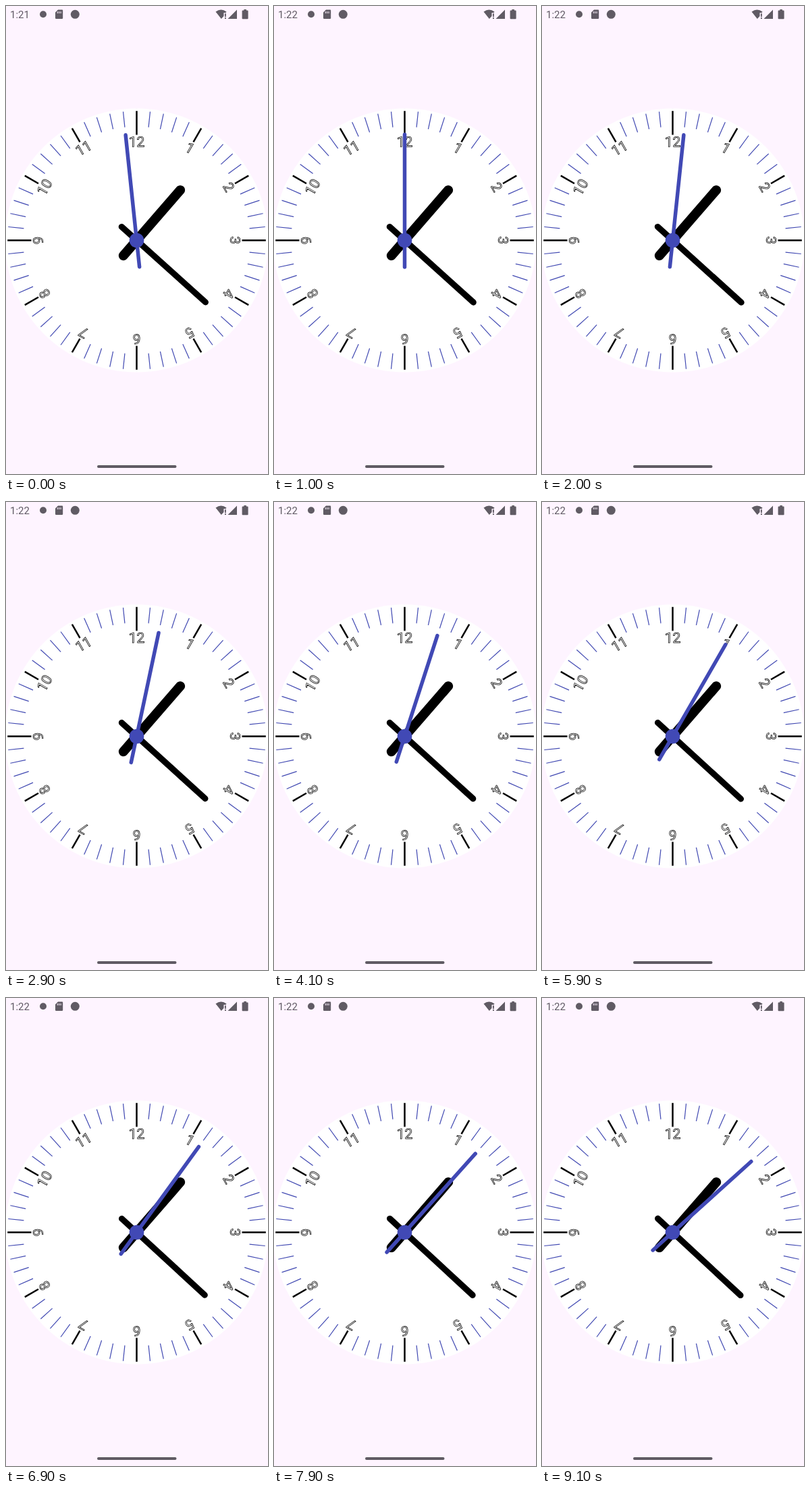
An HTML page for the animation above (9700 ms loop, 388 by 692 pixels).

```html
<!DOCTYPE html>
<html lang="en">
<head>
<meta charset="utf-8">
<title>Analog clock</title>
<style>
  html, body { margin: 0; width: 100%; height: 100%; overflow: hidden; background: #fef4ff; }
  svg { display: block; width: 388px; height: 692px; }
  .status { fill: #605b64; }
  .status text { font: 15px Roboto, sans-serif; }
  .tick { stroke: #4149b2; stroke-width: 1.2; }
  .hour { stroke: #000; stroke-width: 2.5; }
  .digit { font: 21px Roboto, sans-serif; text-anchor: middle; fill: none; stroke: #000; stroke-width: .75; }
  .hand { stroke: #000; stroke-linecap: round; }
  .accent { stroke: #4149b5; }
</style>
</head>
<body>
<svg viewBox="0 0 388 692">
  <rect width="388" height="692" fill="#fef4ff"/>
  <g class="status">
    <text id="time" x="6" y="18">1:21</text>
    <circle cx="55" cy="12.3" r="5"/>
    <path d="M77 5.5h6q1.200 0 1.200 1.200v11q0 1.300-1.300 1.300h-8.600q-1.300 0-1.300-1.300v-8.200z"/>
    <path d="M76.300 8v3M78.700 8v3M81.100 8v3" stroke="#fef4ff" stroke-width="1"/>
    <circle cx="102.300" cy="12.300" r="6.500"/>
    <path d="M310.500 8.500Q318.500 2.500 326.500 8.500L325.500 10H322.500V15L318.800 19z"/>
    <path d="M324 11h1.800v5H324zM324 17h1.800v1.900H324z"/>
    <path d="M328.500 19L342 5.500V19z"/>
    <path d="M352.300 5h3.600v1.500h1.700q1 0 1 1v10.700q0 1-1 1h-7q-1 0-1-1V7.500q0-1 1-1h1.700z"/>
    <rect x="135" y="679" width="117.500" height="4" rx="2"/>
  </g>
  <g transform="translate(193.500 346.500)">
    <circle r="195" fill="#fff"/>
    <g id="dial"></g>
    <line id="hour" class="hand" y1="30" y2="-98.500" stroke-width="14"/>
    <line id="minute" class="hand" y1="30" y2="-137" stroke-width="9"/>
    <line id="second" class="hand accent" y1="39.500" y2="-156.500" stroke-width="5.500"/>
    <circle r="10.800" fill="#4149b5"/>
  </g>
</svg>
<script>
  const LOOP = 9700;
  const $ = id => document.getElementById(id);

  function add(tag, attrs, text = '') {
    const el = document.createElementNS('http://www.w3.org/2000/svg', tag);
    for (const key in attrs) el.setAttribute(key, attrs[key]);
    el.textContent = text;
    $('dial').append(el);
  }

  for (let i = 0; i < 60; i++) {
    const transform = `rotate(${i * 6})`;
    const isHour = i % 5 === 0;
    const inner = i % 15 === 0 ? 156 : 168;
    add('line', { class: isHour ? 'hour' : 'tick', y1: -191.3, y2: -inner, transform });
    if (isHour) add('text', { class: 'digit', y: 17.8 - inner, transform }, i / 5 || 12);
  }

  const turn = (id, deg) => $(id).setAttribute('transform', `rotate(${deg})`);
  let shown;

  function frame() {
    // Seconds past 1:22:00, ticking 900 ms into the loop
    const sec = Math.floor((performance.now() % LOOP - 900) / 1000);
    if (sec !== shown) {
      shown = sec;
      const min = 22 + sec / 60;
      turn('second', sec * 6);
      turn('minute', min * 6);
      turn('hour', 30 + min / 2);
      $('time').textContent = '1:' + Math.floor(min);
    }
    requestAnimationFrame(frame);
  }
  frame();
</script>
</body>
</html>
```
